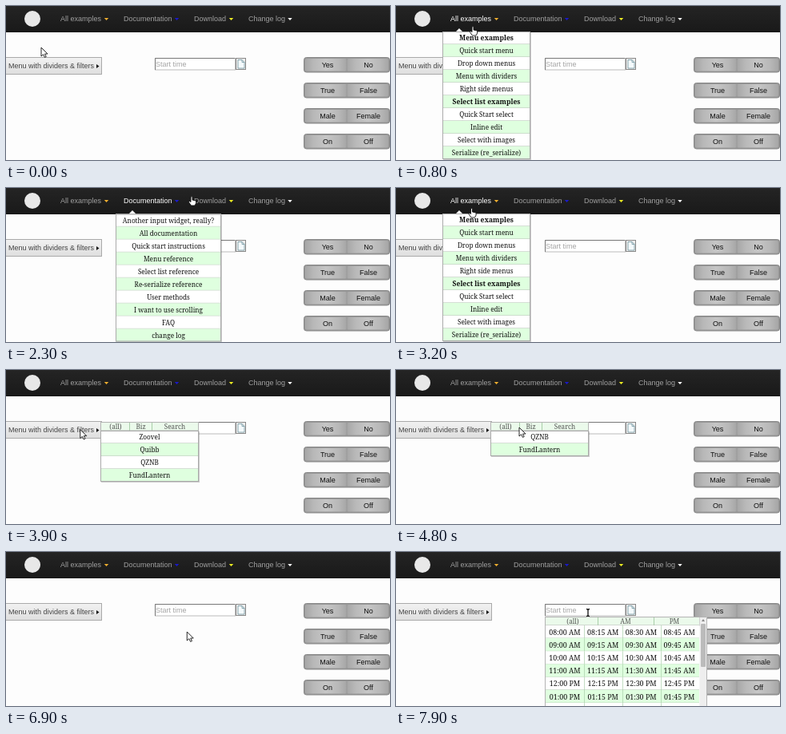
An HTML page that plays this animation: 480 by 193 pixels, repeating every 8000 ms.

```html
<!DOCTYPE html>
<html lang="en">
<head>
<meta charset="utf-8">
<title>Menu demo</title>
<style>
html, body { margin: 0; width: 100%; height: 100%; overflow: hidden; background: #fdfdfd; }
svg { display: block; width: 100vw; height: 100vh; }
text { font: 9px "Liberation Sans", Arial, sans-serif; }
.serif { font: 8.2px "Noto Serif", Georgia, serif; }
.bold { font-weight: bold; font-size: 8.5px; }
.clock { font-size: 8.9px; }
</style>
</head>
<body>
<svg viewBox="0 0 480 193">
  <defs>
    <linearGradient id="bar" x2="0" y2="1"><stop stop-color="#242424"/><stop offset="1" stop-color="#191919"/></linearGradient>
    <linearGradient id="btn" x2="0" y2="1"><stop stop-color="#f2f2f2"/><stop offset="1" stop-color="#dedede"/></linearGradient>
    <linearGradient id="metal"><stop stop-color="#a6a6a6"/><stop offset=".2" stop-color="#b8b8b8"/><stop offset=".5" stop-color="#c6c6c6"/><stop offset=".8" stop-color="#b8b8b8"/><stop offset="1" stop-color="#a6a6a6"/></linearGradient>
  </defs>
  <g id="page"></g>
  <g id="live"></g>
</svg>
<script>
const GREEN = '#dfffdf', PALE = '#ebfaeb', LINE = '#b4b4b4';
const $ = id => document.getElementById(id);
const rect = (x, y, w, h, fill, more = '') =>
  `<rect x="${x}" y="${y}" width="${w}" height="${h}" fill="${fill}" ${more}/>`;
const path = (d, fill, more = '') => `<path d="${d}" fill="${fill}" ${more}/>`;
const text = (x, y, s, fill, cls = '', anchor = 'middle') =>
  `<text x="${x}" y="${y}" fill="${fill}" class="${cls}" text-anchor="${anchor}">${s}</text>`;
const serif = (x, y, s, fill = '#111', cls = '') => text(x, y, s, fill, 'serif ' + cls);
const frame = (x, y, w, h, color = '#aaa') =>
  rect(x + .5, y + .5, w - 1, h - 1, 'none', `stroke="${color}"`);

// label, text x, caret x, caret colour, left and right hover edge
const nav = [
  ['All examples', 68, 125.5, '#f0b030', 58, 137],
  ['Documentation', 147, 213.5, '#1a1acc', 137, 225],
  ['Download', 235, 281.5, '#eeee22', 225, 293],
  ['Change log', 303, 355, '#ffffff', 293, 367]
];
const examples = ['*Menu examples', 'Quick start menu', 'Drop down menus', 'Menu with dividers',
  'Right side menus', '*Select list examples', 'Quick Start select', 'Inline edit',
  'Select with images', 'Serialize (re_serialize)'];
const docs = ['Another input widget, really?', 'All documentation', 'Quick start instructions',
  'Menu reference', 'Select list reference', 'Re-serialize reference', 'User methods',
  'I want to use scrolling', 'FAQ', 'change log'];
const biz = ['QZNB', 'FundLantern'], search = ['Zoovel', 'Quibb'];

// time, x, y of the pointer's hot spot
const route = [
  [0, 44, 52], [300, 62, 42], [500, 92, 23], [800, 95, 26], [1100, 98, 80], [1400, 103, 151],
  [1500, 104, 178], [1700, 112, 140], [1900, 145, 30], [2000, 165, 18], [2300, 231, 11],
  [2500, 255, 16], [2800, 180, 18], [3100, 94, 25], [3300, 93, 27], [3600, 70, 74],
  [4100, 108, 75], [4500, 135, 72], [4800, 154, 72], [5100, 170, 71], [5500, 200, 68],
  [5900, 213, 67], [6300, 215, 82], [6600, 215, 115], [7000, 230, 95], [7300, 238, 76], [7900, 240, 76]
];

function pointer(t) {
  const i = route.findIndex(k => k[0] >= t);
  if (i < 1) return route[0].slice(1);
  const [a, ax, ay] = route[i - 1], [b, bx, by] = route[i], p = (t - a) / (b - a);
  return [ax + (bx - ax) * p, ay + (by - ay) * p];
}

function drawPage() {
  let s = rect(0, 0, 480, 33, 'url(#bar)') + '<circle cx="33" cy="16" r="10" fill="#e8e8e8"/>';
  s += rect(-1, 64.5, 120.5, 21, 'url(#btn)', 'stroke="#aaa"')
    + text(3, 78, 'Menu with dividers &amp; filters', '#444', '', 'start')
    + path('M113 73l3.5 2.5-3.5 2.5z', '#111');
  s += rect(186.5, 65.5, 100, 14.5, '#fff', 'stroke="#bbb"')
    + path('M186.5 80V65.5H286', 'none', 'stroke="#777"')
    + text(187, 75.5, 'Start time', '#a5a5a5', '', 'start');
  s += rect(287.5, 65.5, 12, 14, '#eee', 'stroke="#888"')
    + path('M290 67.5h5l3 3v7.5h-8z', '#f4fafc', 'stroke="#5f8894" stroke-width=".7"')
    + path('M295 67.5v3h3', 'none', 'stroke="#5f8894" stroke-width=".7"');
  [['Yes', 'No'], ['True', 'False'], ['Male', 'Female'], ['On', 'Off']].forEach((pair, i) => {
    const y = 64.5 + i * 32;
    s += rect(372.5, y, 107, 18.5, '#999', 'rx="3" stroke="#888"');
    pair.forEach((label, j) => {
      s += rect(374 + j * 52, y + 1.5, 52, 15.5, 'url(#metal)', 'rx="2"')
        + text(402 + j * 51, y + 12.2, label, '#111');
    });
    s += rect(425.5, y + 2, 1, 14.5, '#999');
  });
  return s;
}

function list(x, y, w, items, [px, py]) {
  const h = items.length * 16;
  const over = px > x && px < x + w ? Math.floor((py - y) / 16) : -1;
  let s = rect(x + 1, y + 1, w, h, '#000', 'opacity=".2"');
  items.forEach((item, i) => {
    const bold = item[0] == '*', hot = i == over && !bold, top = y + i * 16;
    s += rect(x, top, w, 16, hot ? '#dcdcdc' : i % 2 ? GREEN : '#fff')
      + rect(x, top + 15.3, w, .7, '#c5d0c5')
      + serif(x + w / 2, top + 11, bold ? item.slice(1) : item, hot ? '#b52a2a' : '#111', bold ? 'bold' : '');
  });
  return s + frame(x, y, w, h);
}

// filter strip: cells are [left edge, label, label x]
function filters(x, y, w, h, cells) {
  return rect(x, y, w, h, PALE) + cells.map(([left, label, cx]) =>
    rect(left, y, 1, h, '#a9cfa9') + serif(cx, y + h / 2 + 2.8, label, '#555')).join('')
    + frame(x, y, w, h, LINE);
}

function times() {
  let s = rect(186, 81, 203, 112, '#fff')
    + filters(186, 81, 194, 11.5, [[186, '(all)', 221], [252, 'AM', 287], [322, 'PM', 348]]);
  for (let r = 0; r < 7; r++) {
    const y = 92 + r * 16.2, hour = String((r + 7) % 12 + 1).padStart(2, '0');
    s += rect(187, y, 192, 16.2, r % 2 ? GREEN : '#fff') + rect(187, y + 15.6, 192, .6, '#b9cfb9');
    for (let c = 0; c < 4; c++) {
      s += serif(211 + c * 47.7, y + 11.5, `${hour}:${['00', 15, 30, 45][c]} ${r < 4 ? 'AM' : 'PM'}`, '#111', 'clock');
      if (c) s += rect(187 + c * 48, y, .7, 16.2, '#a9cfa9');
    }
  }
  return s + rect(379.5, 81, 9, 112, '#eee') + path('M382 87l2-3 2 3z', '#888')
    + rect(381, 90, 6, 54, '#bbb', 'rx="1"') + path('M186.5 193V81.5H388.5V193', 'none', `stroke="${LINE}"`);
}

function cursor(kind, [x, y]) {
  const shapes = {
    arrow: path('M0 0V11L2.6 8.7 4.4 12.4 6.2 11.5 4.5 8H8z', '#fff', 'stroke="#111" stroke-width=".9"'),
    hand: path('M0 0q1.3-1 2 .4V4l4.6 1V8L5 11H.4L-2.6 6.5-1.3 5.4 0 6.6z', '#fff', 'stroke="#111" stroke-width=".9"'),
    beam: ['#fff', '#111'].map((c, i) =>
      path('M-2-4.5Q0-4.5 0-3Q0-4.5 2-4.5M0-3V3M-2 4.5Q0 4.5 0 3Q0 4.5 2 4.5', 'none',
        `stroke="${c}" stroke-width="${i ? 1.3 : 2.8}"`)).join('')
  };
  return `<g transform="translate(${x} ${y})">${shapes[kind]}</g>`;
}

function draw(t) {
  const within = (a, b) => t >= a && t < b;
  const over = pointer(Math.max(0, t - 100)); // hover trails the pointer by one step
  let s = nav.map(([label, x, cx, color, left, right]) => {
    const hot = over[1] < 32 && over[0] >= left && over[0] < right;
    return text(x, 19.3, label, hot ? '#fff' : '#a0a0a0', '', 'start')
      + path(`M${cx - 2.7} 15h5.4l-2.7 2.9z`, color);
  }).join('');

  const tip = x => path(`M${x - 4.5} 32.5l4.5-4.5 4.5 4.5z`, '#fff');
  if (within(500, 1900) || within(3000, 3500)) s += tip(79) + list(58, 32, 110, examples, over);
  if (within(1900, 2500) || within(2700, 3000)) s += tip(158) + list(137, 32.5, 132, docs, over);
  if (within(3800, 6600)) {
    const items = t < 4600 ? [...search, ...biz] : t < 5300 ? biz : search;
    s += filters(118, 65, 123, 11.5, [[118, '(all)', 137], [154, 'Biz', 168.5], [182, 'Search', 211]])
      + list(118, 76, 123, items, over);
  }
  if (t >= 7300) s += times();

  const kind = within(500, 1300) || within(1900, 3500) ? 'hand'
    : within(1300, 1900) || within(5500, 6300) || t >= 7200 ? 'beam' : 'arrow';
  return s + cursor(kind, pointer(t));
}

$('page').innerHTML = drawPage();
let last = -1;
function tick() {
  const t = Math.floor(performance.now() % 8000 / 100) * 100;
  if (t != last) $('live').innerHTML = draw(last = t);
  requestAnimationFrame(tick);
}
tick();
</script>
</body>
</html>
```
